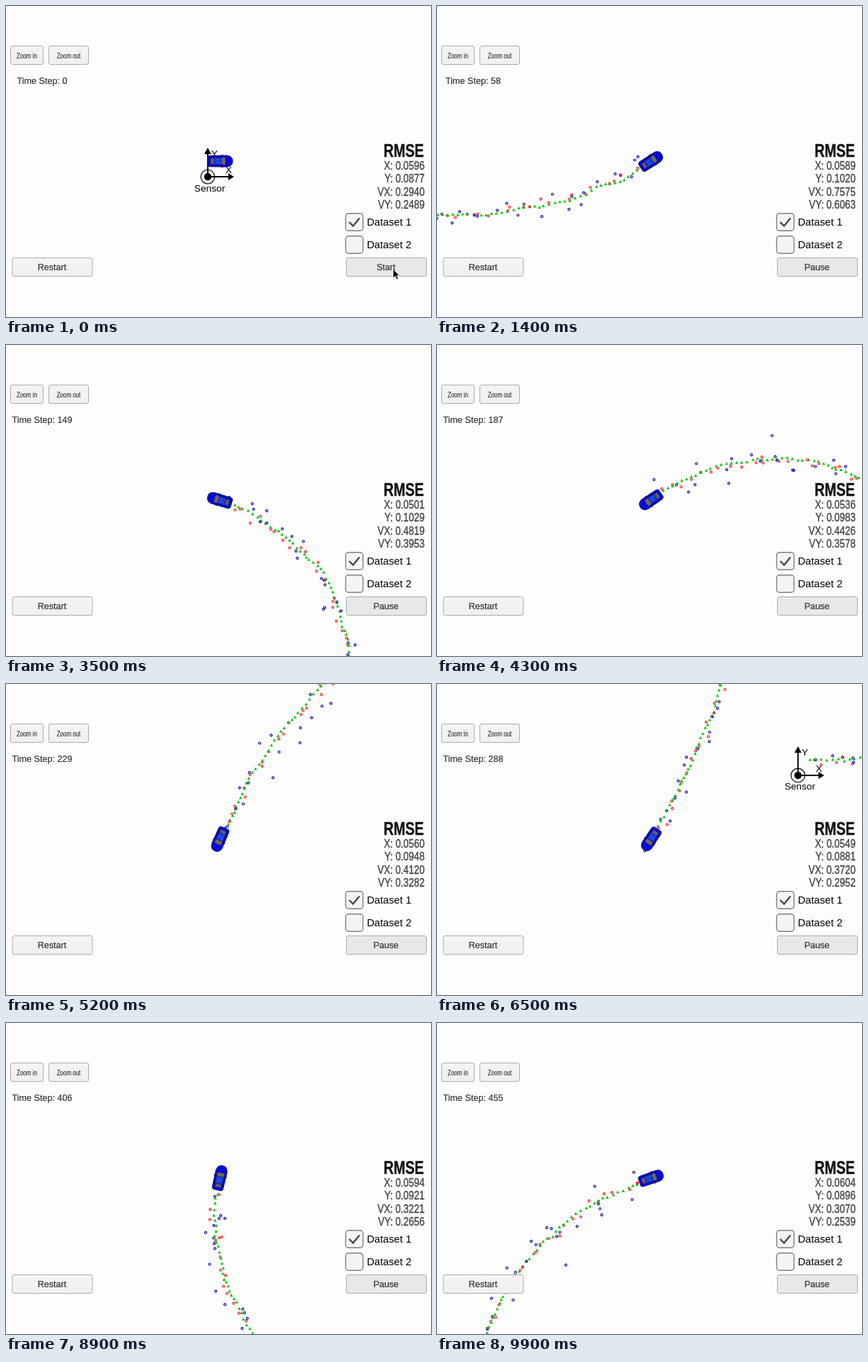
An HTML page that plays this animation: 600 px wide and 439 px high, repeating every 10 s.

```html
<!DOCTYPE html>
<html lang="en">
<head>
<meta charset="utf-8">
<title>Sensor fusion simulator</title>
<style>
  html, body { margin: 0; width: 100%; height: 100%; overflow: hidden; background: #fefdfe; }
  svg { display: block; width: 600px; height: 439px; font-family: "Liberation Sans", Arial, sans-serif; }
  .button { fill: url(#face); stroke: #acacac; }
  .active { fill: #e9e8e9; }
  .label, .zoom { fill: #323232; stroke: #323232; stroke-width: .2; text-anchor: middle; }
  .label { font-size: 12.6px; }
  .zoom { font-size: 11px; }
  .value { font-size: 16.5px; fill: #444; stroke: #444; stroke-width: .4; text-anchor: end; }
  .lidar { fill: none; stroke: #ee1212; stroke-width: 1.1; }
  .radar { fill: none; stroke: #0c0ca4; stroke-width: 1.2; }
  .estimate { fill: #0cc40c; }
</style>
</head>
<body>
<svg viewBox="0 0 600 439">
  <defs>
    <linearGradient id="face" x2="0" y2="1">
      <stop offset="0" stop-color="#f5f4f5"/>
      <stop offset="1" stop-color="#f1f0f1"/>
    </linearGradient>
  </defs>

  <g id="world">
    <g id="trail"></g>
    <g transform="translate(.5 4.4)">
      <path d="M0 0V-34M0 0H31" stroke="#000" stroke-width="2"/>
      <path d="M0-41L5-32H-5ZM37 0L29-5V5Z"/>
      <circle r="9.8" fill="none" stroke="#000" stroke-width="1.2"/>
      <circle r="5.2"/>
      <g font-size="13.7">
        <text x="5" y="-28">Y</text>
        <text x="25" y="-5">X</text>
        <text x="-19" y="20.5">Sensor</text>
      </g>
    </g>
  </g>

  <g id="car">
    <path d="M3-9.5L6-7H1ZM3 9.5L6 7H1Z" fill="#101060"/>
    <path d="M-17-5Q-17-7.5-13-7.8L10-8Q18-7 18 0T10 8L-13 7.8Q-17 7.5-17 5Z" fill="#0808e0" stroke="#0c0c78"/>
    <path d="M-8-5H3V5H-8Z" fill="#1638dc"/>
    <path d="M-13-4.5L-8-4V4L-13 4.5Q-14 0-13-4.5Z" fill="#5c5e6c" stroke="#101060" stroke-width=".6"/>
    <path d="M2-4.5L7-6Q9.5 0 7 6L2 4.5Z" fill="#6c675f" stroke="#101060" stroke-width=".6"/>
    <path d="M-11-6.2H5M-11 6.2H5M-4-6V-4M-4 6V4" stroke="#0c1068"/>
    <path d="M-6-2H0M-6 2H0" stroke="#3a70ea"/>
  </g>

  <g>
    <rect class="button" x="6.5" y="56.5" width="46" height="26" rx="2.5"/>
    <rect class="button" x="60.5" y="56.5" width="56" height="26" rx="2.5"/>
    <text class="zoom" transform="translate(29.5 73.5) scale(.73 1)">Zoom in</text>
    <text class="zoom" transform="translate(88.5 73.5) scale(.72 1)">Zoom out</text>
    <text id="counter" class="label" x="51" y="109.5"></text>

    <text transform="translate(590 212.5) scale(.76 1)" font-size="26" font-weight="bold" text-anchor="end" fill="#111" stroke="#111" stroke-width=".4">RMSE</text>
    <g id="values"></g>

    <g fill="#f5f4f5" stroke="#808080" stroke-width="1.4">
      <rect x="479.5" y="292.8" width="24.5" height="24.5" rx="4"/>
      <rect x="479.5" y="324.8" width="24.5" height="24.5" rx="4"/>
    </g>
    <path d="M484.5 305L490 310.5L499 299.5" fill="none" stroke="#484848" stroke-width="2.4"/>
    <g font-size="14.7">
      <text x="509.5" y="310">Dataset 1</text>
      <text x="509.5" y="342">Dataset 2</text>
    </g>

    <rect class="button" x="9" y="355.5" width="113" height="26" rx="2.5"/>
    <rect class="button active" x="480.5" y="355.5" width="113" height="26" rx="2.5"/>
    <text class="label" x="65" y="373">Restart</text>
    <text id="action" class="label" x="536.5" y="373"></text>
    <path id="cursor" d="M546.5 371.5V384L549.5 381.3L551.5 386L553.7 385L551.7 380.6H555.5Z" stroke="#fff" stroke-width=".7"/>
  </g>
</svg>

<script>
const LOOP = 10000, FRAME = 100, STEPS = 500, DT = 0.05;
const SCALE = 29.4, CENTER = { x: 302, y: 219 };
const NAMES = ["X", "Y", "VX", "VY"];
const IDLE = [0.0596, 0.0877, 0.2940, 0.2489];

// time in ms, simulation step, RMSE of x, y, vx, vy
const KEYS = [
  [100, 2, 0.2100, 0.1000, 3.7000, 0.5000],
  [1400, 58, 0.0589, 0.1020, 0.7575, 0.6063],
  [3500, 149, 0.0501, 0.1029, 0.4819, 0.3953],
  [5200, 229, 0.0560, 0.0948, 0.4120, 0.3282],
  [6500, 288, 0.0549, 0.0881, 0.3720, 0.2952],
  [8000, 361, 0.0582, 0.0949, 0.3387, 0.2786],
  [9900, 455, 0.0604, 0.0896, 0.3070, 0.2539]
];

const byId = id => document.getElementById(id);
const lerp = (a, b, u) => a + (b - a) * u;

function add(parent, tag, attrs) {
  const node = document.createElementNS("http://www.w3.org/2000/svg", tag);
  for (const name in attrs) node.setAttribute(name, attrs[name]);
  return parent.appendChild(node);
}

let seed = 29;
function random() {
  seed = (seed * 1664525 + 1013904223) % 4294967296;
  return (seed + 0.5) / 4294967296;
}
const gauss = () => Math.sqrt(-2 * Math.log(random())) * Math.cos(2 * Math.PI * random());

// Speed and turn rate both oscillate, which gives a symmetric S-shaped drive.
function drive() {
  const poses = [];
  let x = 0.6, y = 0.6, yaw = 0;
  for (let k = 1; k <= STEPS; k++) {
    poses.push({ x, y, yaw });
    const phase = 2 * Math.PI * k / STEPS;
    const speed = 5 + 0.2 * Math.cos(2 * phase);
    x += speed * Math.cos(yaw) * DT;
    y += speed * Math.sin(yaw) * DT;
    yaw += 0.55 * Math.sin(phase) * DT;
  }
  return poses;
}

function addMarkers(poses) {
  let errX = 0, errY = 0;
  return poses.map(({ x, y }, k) => {
    const group = add(byId("trail"), "g", {});
    let mx, my;
    if (k % 2) {
      const range = Math.hypot(x, y) + 0.3 * gauss();
      const bearing = Math.atan2(y, x) + 0.03 * gauss();
      mx = range * Math.cos(bearing);
      my = range * Math.sin(bearing);
    } else {
      mx = x + 0.15 * gauss();
      my = y + 0.15 * gauss();
    }
    add(group, "circle", { class: k % 2 ? "radar" : "lidar", cx: mx * SCALE, cy: -my * SCALE, r: 1.5 });
    errX = 0.85 * errX + 0.03 * gauss();
    errY = 0.85 * errY + 0.04 * gauss();
    const px = (x + errX) * SCALE, py = -(y + errY) * SCALE;
    add(group, "path", { class: "estimate", d: `M${px} ${py - 2.2}l2.2 4.2h-4.4z` });
    return group;
  });
}

const poses = drive();
const markers = addMarkers(poses);
const values = NAMES.map((name, i) => add(byId("values"), "text", {
  class: "value", transform: `translate(591 ${[231, 249, 268, 285.5][i]}) scale(.815 1)`
}));

function stateAt(time) {
  if (time < KEYS[0][0]) return { step: 0, rmse: IDLE };
  let i = 0;
  while (i < KEYS.length - 2 && time >= KEYS[i + 1][0]) i++;
  const [t0, s0, ...r0] = KEYS[i], [t1, s1, ...r1] = KEYS[i + 1];
  const step = Math.round(lerp(s0, s1, (time - t0) / (t1 - t0)));
  // Squared errors accumulate, so blend their sums rather than the roots.
  const u = (step - s0) / (s1 - s0);
  const rmse = r0.map((r, j) => Math.sqrt(lerp(s0 * r * r, s1 * r1[j] * r1[j], u) / step));
  return { step, rmse };
}

function render(time) {
  const { step, rmse } = stateAt(time);
  const { x, y, yaw } = poses[step];
  byId("world").setAttribute("transform", `translate(${CENTER.x - x * SCALE} ${CENTER.y + y * SCALE})`);
  byId("car").setAttribute("transform", `translate(${CENTER.x} ${CENTER.y}) rotate(${-yaw * 180 / Math.PI})`);
  markers.forEach((m, k) => m.setAttribute("display", k < step ? "inline" : "none"));
  values.forEach((v, i) => v.textContent = `${NAMES[i]}: ${rmse[i].toFixed(4)}`);
  byId("counter").textContent = `Time Step: ${step}`;
  byId("action").textContent = step ? "Pause" : "Start";
  byId("cursor").setAttribute("display", step ? "none" : "inline");
}

const start = performance.now();
let shown = -1;
function tick() {
  const frame = Math.floor((performance.now() - start) % LOOP / FRAME);
  if (frame !== shown) render((shown = frame) * FRAME);
  requestAnimationFrame(tick);
}
tick();
</script>
</body>
</html>
```
